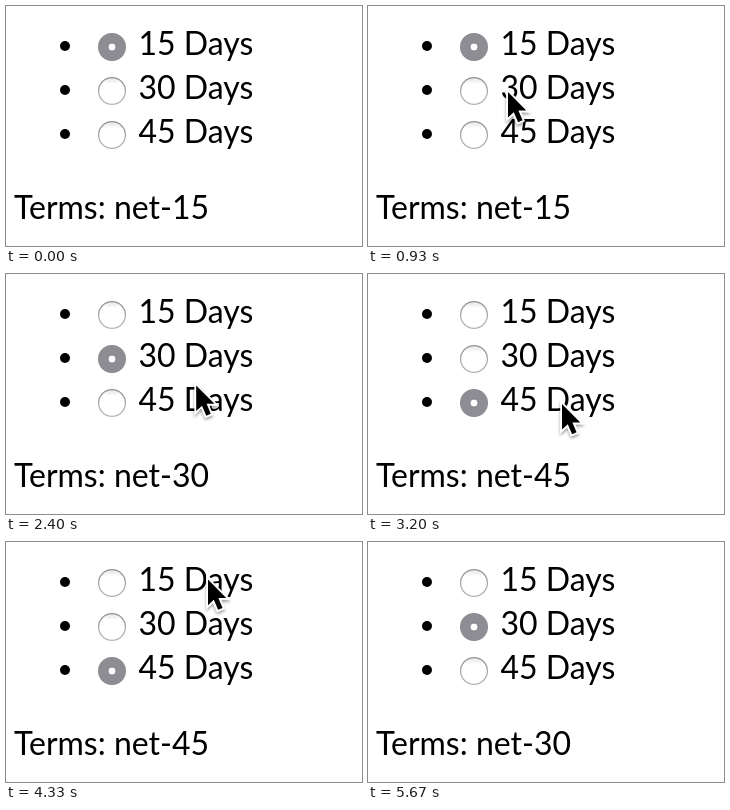
These frames come from a looping animation (356x240 px, 6340 ms). An HTML page:

```html
<!DOCTYPE html>
<html lang="en">
<head>
<meta charset="utf-8">
<title>Payment terms</title>
<style>
  html, body { margin: 0; width: 100%; height: 100%; overflow: hidden; background: #fff; }
  svg { display: block; }
  text { font: 32px Lato, "Open Sans", sans-serif; }
</style>
</head>
<body>
<svg width="356" height="240" viewBox="0 0 356 240">
  <defs>
    <linearGradient id="rim" x2="0" y2="1">
      <stop offset="0" stop-color="#929292"/>
      <stop offset="1" stop-color="#b4b4b4"/>
    </linearGradient>
    <linearGradient id="face" x2="0" y2="1">
      <stop offset="0" stop-color="#e2e2e2"/>
      <stop offset=".25" stop-color="#fff"/>
    </linearGradient>
    <filter id="shadow" x="-40%" y="-20%" width="200%" height="150%">
      <feDropShadow dx="0" dy="2" stdDeviation="1.6" flood-opacity=".4"/>
    </filter>
  </defs>
  <g id="options"></g>
  <text id="terms" x="8" y="213"></text>
  <path id="cursor" d="M0 0V25.6L5.8 20.2L10.1 30.2L14.6 28.3L10.4 18.4H18.3Z"
        stroke="#fff" stroke-width="3.6" paint-order="stroke" filter="url(#shadow)"/>
</svg>
<script>
const LOOP = 6340, FPS = 15, ROW = 44;
const days = [15, 30, 45];

// Pointer glides in ticks; row is measured in options, 0 being the first.
const enter = { tick: 9, x: 280, row: 2.6 }, exit = 85;
const glides = [
  { from: 9, to: 14, x: 140, row: 1 },
  { from: 14, to: 18, x: 125, row: 1 },
  { from: 18, to: 24, x: 185, row: 1 },
  { from: 35, to: 39, x: 194, row: 2 },
  { from: 53, to: 60, x: 203, row: 0.1 },
  { from: 62, to: 65, x: 202, row: -0.1 },
  { from: 71, to: 75, x: 193, row: 0.9 },
  { from: 82, to: exit, x: 292, row: 3.3 }
];
const clicks = [29, 47, 66, 79];

const byId = id => document.getElementById(id);
const clamp = v => Math.min(1, Math.max(0, v));
const easeOut = u => 1 - (1 - u) ** 3;

byId('options').innerHTML = days.map((d, i) => `
  <g transform="translate(0 ${i * ROW})">
    <circle cx="59" cy="40" r="5"/>
    <circle class="ring" cx="106" cy="41" r="13.4" stroke-width="1.2"/>
    <circle class="dot" cx="106" cy="41" r="4" fill="#fff" stroke="#7b7a80" stroke-width=".8"/>
    <text x="132.5" y="49">${d} Days</text>
  </g>`).join('');
const rings = document.querySelectorAll('.ring');
const dots = document.querySelectorAll('.dot');

function pointerAt(tick) {
  let { x, row } = enter;
  for (const g of glides) {
    const u = easeOut(clamp((tick - g.from) / (g.to - g.from)));
    x += (g.x - x) * u;
    row += (g.row - row) * u;
  }
  return { x, row };
}

const optionAt = tick => Math.round(pointerAt(tick).row);

function draw(ms) {
  const tick = Math.floor((ms % LOOP + 4) * FPS / 1000);
  const lastClick = clicks.filter(t => t < tick).pop();
  const chosen = lastClick ? optionAt(lastClick) : 0;
  const pressed = clicks.includes(tick) ? optionAt(tick) : -1;

  days.forEach((_, i) => {
    const on = i === chosen;
    rings[i].setAttribute('fill', on ? '#8e8d93' : i === pressed ? '#dcdcdc' : 'url(#face)');
    rings[i].setAttribute('stroke', on ? '#8e8d93' : 'url(#rim)');
    dots[i].setAttribute('visibility', on ? 'visible' : 'hidden');
  });
  byId('terms').textContent = `Terms: net-${days[chosen]}`;

  const { x, row } = pointerAt(tick);
  const visible = tick >= enter.tick && tick < exit;
  byId('cursor').setAttribute('visibility', visible ? 'visible' : 'hidden');
  byId('cursor').setAttribute('transform', `translate(${x} ${42 + row * ROW})`);
}

const start = performance.now();
function frame() {
  draw(performance.now() - start);
  requestAnimationFrame(frame);
}
frame();
</script>
</body>
</html>
```
